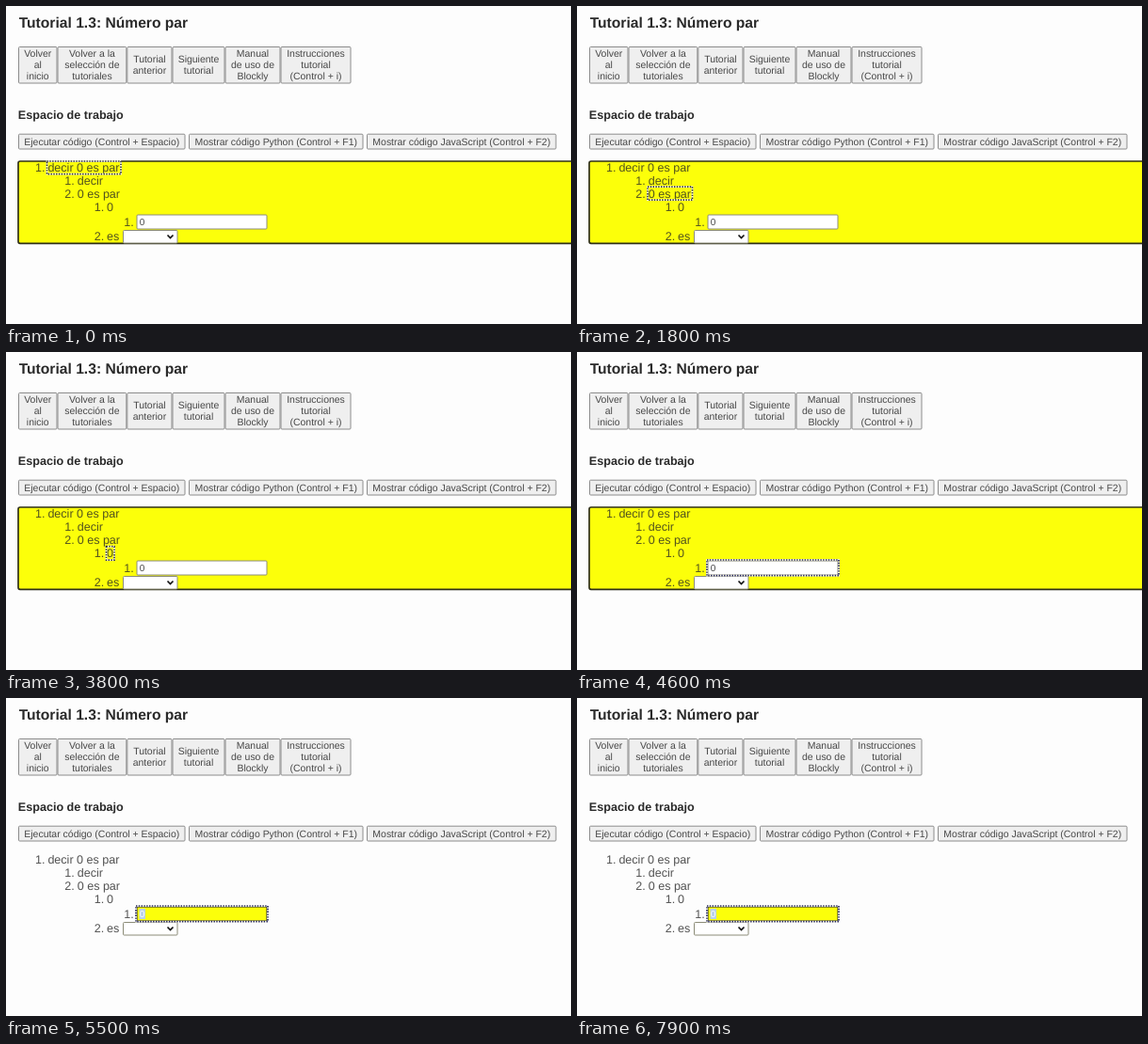
Recreate the animation shown at these times as an HTML page. Size 600x338 px, loop 8000 ms.

```html
<!DOCTYPE html>
<html lang="es">
<head>
<meta charset="utf-8">
<style>
html, body { margin: 0; width: 100%; height: 100%; overflow: hidden; background: #fdfdfd; }
svg { display: block; font-family: "Liberation Sans", Arial, sans-serif; text-rendering: geometricPrecision; }
.title { font-size: 15.63px; font-weight: bold; fill: #2a2a2a; }
.head { font-size: 12.6px; font-weight: bold; fill: #2a2a2a; }
.label { font-size: 10.47px; text-anchor: middle; fill: #484848; }
.item { font-size: 12.55px; fill: #222; fill-opacity: .78; }
.value { font-size: 10px; fill: #444; }
.button { fill: #efefef; stroke: #8c8c8c; }
.field { fill: #fff; stroke: #8c8c78; }
#panel { fill: #fcff0a; stroke: #303018; stroke-width: 1.7; }
.focus { fill: none; stroke: #fffff0; stroke-width: 1.7; }
.dots { stroke: #333; stroke-dasharray: 1.4 1.4; }
</style>
</head>
<body>
<svg id="stage" width="600" height="338" viewBox="0 0 600 338"></svg>
<script>
const stage = document.getElementById("stage");

function add(tag, attrs, content = "") {
  const el = document.createElementNS("http://www.w3.org/2000/svg", tag);
  for (const key in attrs) el.setAttribute(key, attrs[key]);
  el.textContent = content;
  return stage.appendChild(el);
}
const text = (cls, x, y, content) => add("text", { class: cls, x, y }, content);
const box = (attrs, x, y, width, height, rx = 1) => add("rect", { ...attrs, x, y, width, height, rx });

function button(left, right, top, bottom, lines) {
  box({ class: "button" }, left, top, right - left, bottom - top);
  const first = (top + bottom) / 2 + 3.4 - (lines.length - 1) * 5.9;
  lines.forEach((line, i) => text("label", (left + right) / 2, first + i * 11.8, line));
}

text("title", 13.7, 22.6, "Tutorial 1.3: Número par");
[
  [13.5, 54, "Volver|al|inicio"],
  [55, 127.8, "Volver a la|selección de|tutoriales"],
  [128.8, 176, "Tutorial|anterior"],
  [177, 232, "Siguiente|tutorial"],
  [233, 291, "Manual|de uso de|Blockly"],
  [292, 366, "Instrucciones|tutorial|(Control + i)"]
].forEach(([l, r, s]) => button(l, r, 43.5, 82, s.split("|")));

text("head", 12.8, 119.5, "Espacio de trabajo");
[
  [13.5, 190, "Ejecutar código (Control + Espacio)"],
  [194.5, 379, "Mostrar código Python (Control + F1)"],
  [383.5, 584, "Mostrar código JavaScript (Control + F2)"]
].forEach(([l, r, s]) => button(l, r, 136.2, 152, [s]));

const panel = box({ id: "panel" }, 13, 165, 600, 87.3, 2);
[
  [31, 176, "1.", "decir 0 es par"],
  [62.3, 190, "1.", "decir"],
  [62.3, 204, "2.", "0 es par"],
  [93.7, 218, "1.", "0"],
  [125.2, 234, "1.", ""],
  [93.7, 249, "2.", "es"]
].forEach(([x, y, mark, label]) => {
  text("item", x, y, mark);
  text("item", x + 13.4, y, label);
});

const input = box({ class: "field" }, 139, 222, 138, 15);
const selection = box({ fill: "#b9d0ea" }, 141.5, 224, 6.5, 11, 0);
const value = text("value", 141.8, 233.2, "0");
box({ class: "field" }, 124.5, 238.5, 57.5, 13.5);
add("path", { d: "M171.5 243.5l3 3 3-3", fill: "none", stroke: "#111", "stroke-width": 1.7 });
const halo = add("rect", { class: "focus" });
const dots = add("rect", { class: "focus dots" });

// start time, focus box: x, y, width, height
const steps = [
  [0, 43.5, 165, 78.5, 13.6],
  [1000, 75, 179, 29, 14],
  [1500, 75, 192.2, 47.5, 14],
  [2800, 106.5, 206.7, 8.5, 14.5],
  [4600, 138, 221, 140, 16.7]
];

function draw(now) {
  const t = now % 8000;
  const editing = t >= 5500;
  const [start, x, y, width, height] = steps.findLast(step => step[0] <= t);
  for (const [key, size] of Object.entries({ x, y, width, height })) {
    halo.setAttribute(key, size);
    dots.setAttribute(key, size);
  }
  dots.style.stroke = start === 4600 ? "#20205c" : "";
  panel.style.display = editing ? "none" : "";
  selection.style.display = editing ? "" : "none";
  input.style.fill = editing ? "#fcff0a" : "";
  input.style.stroke = editing ? "#222" : "";
  value.style.fill = editing ? "#fff" : "";
  requestAnimationFrame(draw);
}
draw(performance.now());
</script>
</body>
</html>
```
